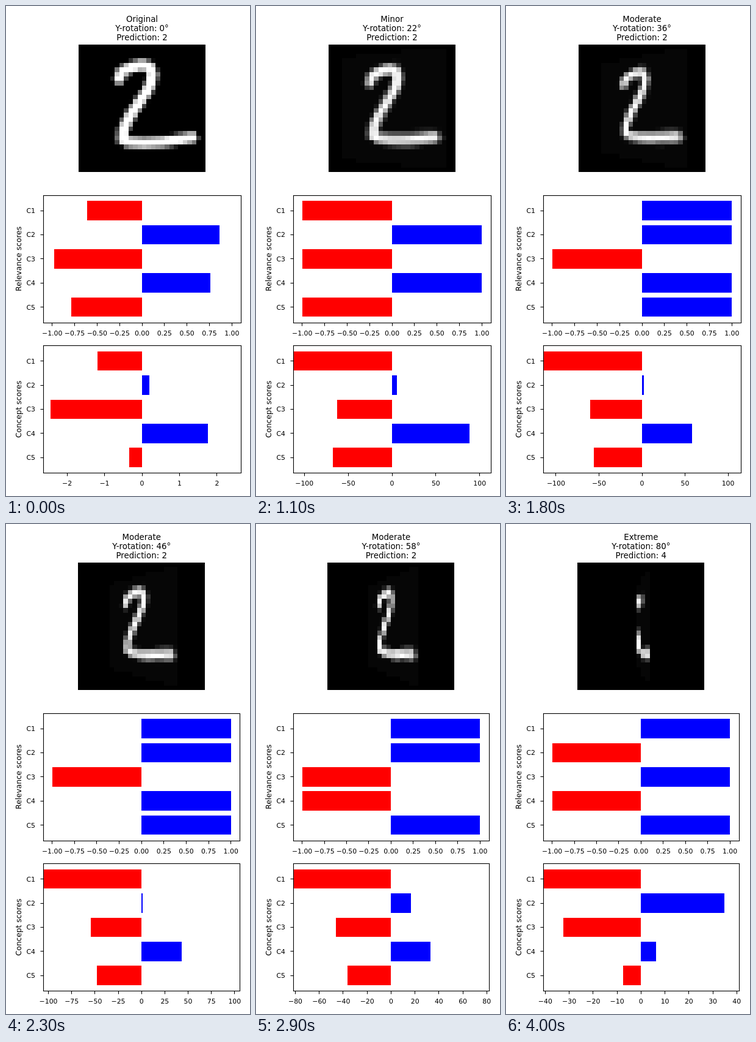
Recreate the animation shown at these times as an HTML page with a canvas. Size 400 by 800 pixels, loop 4.1 s.

```html
<!DOCTYPE html>
<html lang="en">
<head>
<meta charset="utf-8">
<title>Rotated digit</title>
<style>
html, body { margin: 0; width: 100%; height: 100%; overflow: hidden; background: #fff; }
canvas { display: block; }
</style>
</head>
<body>
<canvas id="stage" width="400" height="800"></canvas>
<script>
const ctx = document.getElementById('stage').getContext('2d');
const N = 28, MID = 13.5, FOCAL = 39.6, LEFT = 61, HEIGHT = 208;
const FONT = '"DejaVu Sans", sans-serif';

// Centre line of the handwritten digit, in pixels of the 28 x 28 image
const STROKE = [[8.5, 7], [9.1, 5.4], [11, 4.5], [13.5, 3.9], [15.2, 4.4], [15.8, 6], [15.4, 8.2],
  [14.4, 10], [13, 12], [11.6, 14], [10.4, 16], [9.4, 18.2], [9.2, 20.3], [10.5, 20.9], [14, 21.1],
  [18, 20.9], [22, 20.3], [24.6, 19.9]];

// Concept scores: angle, C1 ... C5
const CONCEPTS = [
  [2, -55, 9.4, -114, 83, -16],
  [14, -102.9, 12.5, -58.8, 119.1, -75.7],
  [20, -107, 7, -61, 96, -69],
  [26, -124.1, 3, -66.7, 72.8, -64.4],
  [46, -105.6, 1.3, -54.4, 43.3, -47.9],
  [58, -81.8, 16.6, -46.2, 32.9, -36.5],
  [68, -60.8, 17.7, -45.7, 23.4, -21.1],
  [80, -40.85, 34.9, -32.4, 6.2, -7.4]];

const clamp = (v, lo, hi) => Math.max(lo, Math.min(hi, v));

function segmentDistance(x, y, [ax, ay], [bx, by]) {
  const dx = bx - ax, dy = by - ay;
  const t = clamp(((x - ax) * dx + (y - ay) * dy) / (dx * dx + dy * dy), 0, 1);
  return Math.hypot(x - ax - t * dx, y - ay - t * dy);
}

const digit = Array.from({ length: N * N }, (_, i) => {
  let d = 99;
  for (let k = 1; k < STROKE.length; k++)
    d = Math.min(d, segmentDistance(i % N, Math.floor(i / N), STROKE[k - 1], STROKE[k]));
  return clamp(1.65 - d, 0, 1);
});

const pixel = (x, y) => x < 0 || y < 0 || x >= N || y >= N ? 0 : digit[y * N + x];

function bilinear(x, y) {
  const i = Math.floor(x), j = Math.floor(y), u = x - i, v = y - j;
  return (pixel(i, j) * (1 - u) + pixel(i + 1, j) * u) * (1 - v) +
    (pixel(i, j + 1) * (1 - u) + pixel(i + 1, j + 1) * u) * v;
}

// The digit turned about the vertical axis, seen in perspective
function rotated(deg) {
  const a = deg * Math.PI / 180, weight = Math.min(1, deg / 26) ** 1.4;
  const cos = Math.cos(a), sin = Math.sin(a) * weight;
  const depth = FOCAL + MID * sin, shift = 0.9 * weight * (1 - (deg / 80) ** 8);
  const base = deg ? 0.025 : 0;
  const values = digit.map((_, i) => {
    const u = i % N - MID + shift, v = Math.floor(i / N) - MID;
    const x = u * depth / (cos * FOCAL + u * sin);
    const y = v * (depth - x * sin) / FOCAL;
    const inside = Math.abs(x) <= MID && Math.abs(y) <= MID;
    return inside ? base + (1 - base) * bilinear(x + MID, y + MID) : 0;
  });
  const peak = Math.max(...values);
  return values.map(v => v / peak);
}

function text(str, x, y, size, align = 'center') {
  ctx.font = `${size}px ${FONT}`;
  ctx.textAlign = align;
  ctx.fillStyle = '#000';
  ctx.fillText(str, x, y);
}

function line(x1, y1, x2, y2) {
  ctx.beginPath();
  ctx.moveTo(x1, y1);
  ctx.lineTo(x2, y2);
  ctx.stroke();
}

function conceptScores(deg) {
  if (!deg) return [-1.18, 0.2, -2.44, 1.76, -0.34];
  const k = Math.max(1, CONCEPTS.findIndex(row => row[0] >= deg));
  const a = CONCEPTS[k - 1], b = CONCEPTS[k];
  const t = (deg - a[0]) / (b[0] - a[0]);
  return a.slice(1).map((v, i) => v + (b[i + 1] - v) * t);
}

function relevanceScores(deg) {
  if (!deg) return [-0.61, 0.865, -0.975, 0.76, -0.79];
  const late = deg >= 36 ? 1 : -1, end = deg >= 62 ? 1 : -1;
  return [late, -end, end, deg >= 52 ? -1 : 1, late];
}

// Smallest round step that gives at most nine intervals
function tickStep(limit) {
  for (let p = 0.01; ; p *= 10)
    for (const m of [1, 2, 2.5, 5])
      if (2 * limit / (m * p) <= 9) return m * p;
}

function chart(top, right, label, values, limit, decimals) {
  const width = right - LEFT, mid = LEFT + width / 2, scale = width / 2 / limit;
  const unit = HEIGHT / 5.28, frameTop = Math.round(top) + 0.5, bottom = frameTop + HEIGHT;
  ctx.lineWidth = 1.1;
  ctx.strokeStyle = '#000';
  values.forEach((v, i) => {
    const y = top + unit * (0.64 + i), y0 = Math.round(y - 0.4 * unit), y1 = Math.round(y + 0.4 * unit);
    const x0 = Math.round(mid), x1 = Math.round(clamp(mid + v * scale, LEFT, right));
    ctx.fillStyle = v < 0 ? '#f00' : '#00f';
    ctx.fillRect(Math.min(x0, x1), y0, Math.abs(x1 - x0), y1 - y0);
    const ty = Math.round(y - 0.5) + 0.5;
    line(56.5, ty, LEFT + 0.5, ty);
    text('C' + (i + 1), 48, Math.round(y + 4), 10.9, 'right');
  });
  ctx.strokeRect(LEFT + 0.5, frameTop, Math.round(right) - LEFT, HEIGHT);

  const step = tickStep(limit), count = Math.floor(limit / step + 1e-6);
  for (let k = -count; k <= count; k++) {
    const x = mid + k * step * scale, tx = Math.round(x - 0.5) + 0.5;
    line(tx, bottom, tx, bottom + 5);
    text((k < 0 ? '−' : '') + Math.abs(k * step).toFixed(decimals), x, bottom + 20.5, 10.9);
  }
  ctx.save();
  ctx.translate(25, top + HEIGHT / 2);
  ctx.rotate(-Math.PI / 2);
  text(label, 0, 0, 12.2);
  ctx.restore();
}

function drawDigit(deg, left, top) {
  const cell = HEIGHT / N, at = i => Math.round(i * cell);
  rotated(deg).forEach((v, i) => {
    const x = i % N, y = Math.floor(i / N), g = Math.round(255 * v);
    ctx.fillStyle = `rgb(${g},${g},${g})`;
    ctx.fillRect(left + at(x), top + at(y), at(x + 1) - at(x), at(y + 1) - at(y));
  });
}

function draw(deg) {
  ctx.fillStyle = '#fff';
  ctx.fillRect(0, 0, 400, 800);

  const concepts = conceptScores(deg);
  const limit = Math.max(...concepts.map(Math.abs)) * (deg < 14 ? 1.08 : 1);
  // The last tick label must stay inside the figure
  const step = tickStep(limit), last = Math.floor(limit / step) * step;
  const halfLabel = String(last).length * 3.5;
  const right = Math.min(385, LEFT + (324.3 - halfLabel) * 2 / (1 + last / limit));
  const mid = (LEFT + right) / 2;

  const grade = !deg ? 'Original' : deg < 30 ? 'Minor' : deg < 60 ? 'Moderate' : 'Extreme';
  const guess = deg < 62 ? 2 : deg < 74 ? 0 : 4;
  text(grade, mid, 26, 13.33);
  text(`Y-rotation: ${deg}°`, mid, 41, 13.33);
  text(`Prediction: ${guess}`, mid, 56, 13.33);

  drawDigit(deg, Math.round(mid - 104), 63);
  chart(308.85, right, 'Relevance scores', relevanceScores(deg), 1.1, 2);
  chart(554.4, right, 'Concept scores', concepts, limit, 0);
}

let shown = -1;
function tick() {
  const deg = 2 * (Math.floor(performance.now() / 100) % 41);
  if (deg !== shown) draw(shown = deg);
  requestAnimationFrame(tick);
}
tick();
</script>
</body>
</html>
```
